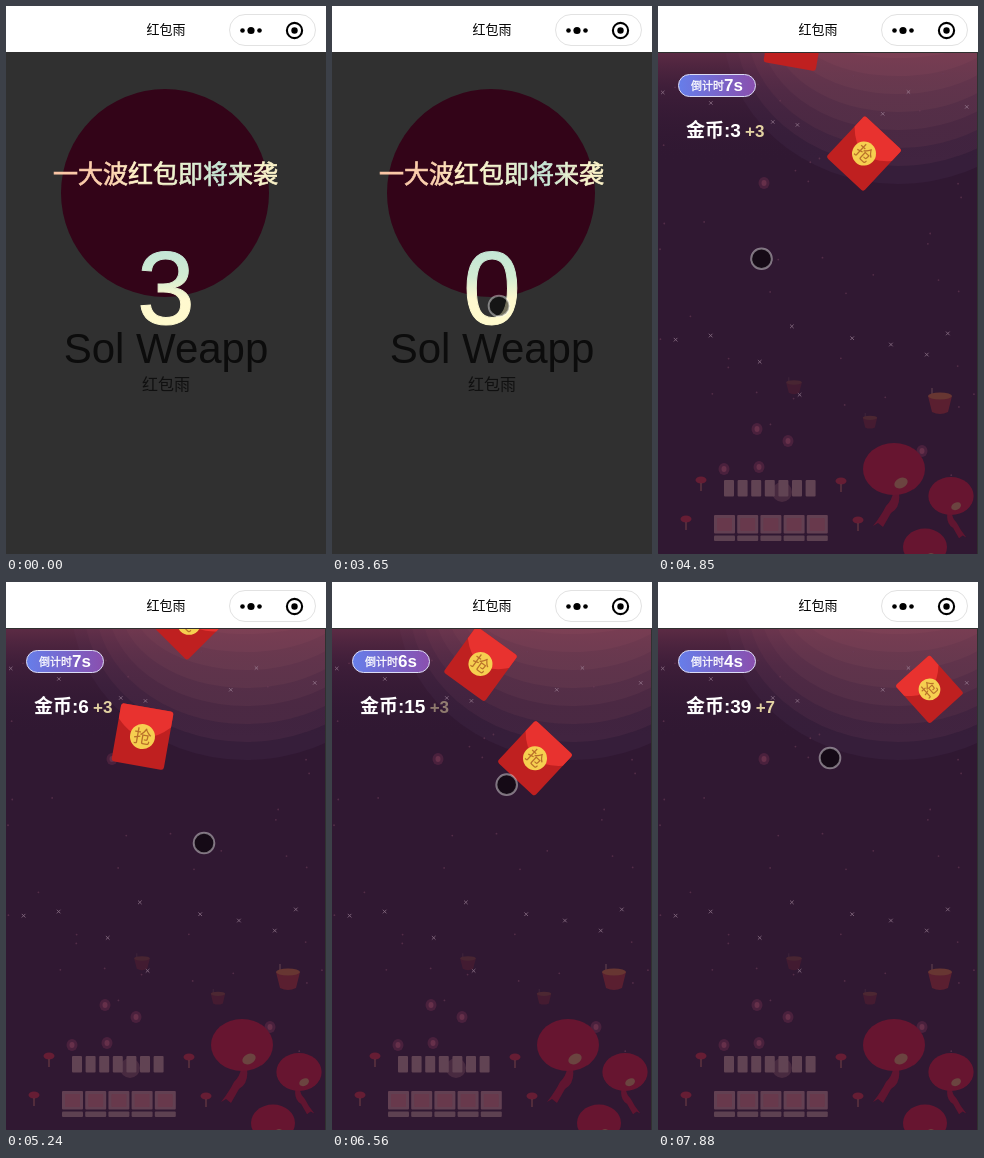
An HTML page for the animation above (8000 ms loop, 320 px wide and 548 px high).

```html
<!DOCTYPE html>
<html lang="zh">
<head>
<meta charset="utf-8">
<style>
html, body { margin: 0; width: 100%; height: 100%; overflow: hidden; background: #fff; }
svg { display: block; width: 320px; height: 548px; }
text { font-family: "Liberation Sans", "Noto Sans CJK SC", "Noto Sans CJK", Arial, sans-serif; }
.mid { text-anchor: middle; }
.bold { font-weight: 700; fill: #fff; }
</style>
</head>
<body>
<svg viewBox="0 0 320 548" xmlns="http://www.w3.org/2000/svg">
  <defs>
    <linearGradient id="title" gradientUnits="userSpaceOnUse" x1="47" y1="0" x2="272" y2="0">
      <stop offset="0" stop-color="#fbc4a4"/><stop offset=".26" stop-color="#fcd3b0"/>
      <stop offset=".38" stop-color="#fff6cc"/><stop offset=".52" stop-color="#f2f3cd"/>
      <stop offset=".74" stop-color="#c6e7d6"/><stop offset=".9" stop-color="#f6f3cc"/>
      <stop offset="1" stop-color="#fdf3c8"/>
    </linearGradient>
    <linearGradient id="digit" gradientUnits="userSpaceOnUse" x1="0" y1="246" x2="0" y2="318">
      <stop offset="0" stop-color="#c4e6d6"/><stop offset=".35" stop-color="#d2ecd2"/>
      <stop offset=".65" stop-color="#fff9cf"/><stop offset="1" stop-color="#fffacd"/>
    </linearGradient>
    <linearGradient id="pill">
      <stop offset="0" stop-color="#667eea"/><stop offset="1" stop-color="#8a4fae"/>
    </linearGradient>
    <linearGradient id="dusk" x1="0" y1="0" x2="0" y2="1">
      <stop offset="0" stop-color="#7a3850" stop-opacity=".6"/>
      <stop offset=".35" stop-color="#5c2a48" stop-opacity=".3"/>
      <stop offset="1" stop-color="#301832" stop-opacity="0"/>
    </linearGradient>
    <clipPath id="stage"><rect y="47" width="319" height="501"/></clipPath>
    <g id="packet">
      <rect x="-26.5" y="-29.5" width="53" height="59" rx="3" fill="#bf2020"/>
      <path d="M-26.5 -14V-26.5q0 -3 3 -3H23.5q3 0 3 3V-14Q0 14 -26.5 -14z" fill="#e8322f"/>
      <circle r="12.5" fill="#f6cf50"/>
      <text class="mid" y="6.5" font-size="18" fill="#b9702a">抢</text>
    </g>
  </defs>

  <g id="intro">
    <rect y="46" width="320" height="502" fill="#303030"/>
    <circle cx="159" cy="187" r="104" fill="#330418"/>
    <text class="mid" x="160" y="357" font-size="42" fill="#0c0c0c">Sol Weapp</text>
    <text class="mid" x="160" y="384" font-size="16" fill="#101010">红包雨</text>
    <text class="mid" x="159.5" y="176.5" font-size="25" fill="url(#title)" stroke="url(#title)" stroke-width=".7">一大波红包即将来袭</text>
    <text class="mid" id="big" x="160" y="317.6" font-size="104" fill="url(#digit)" stroke="url(#digit)">3</text>
  </g>

  <g id="game" clip-path="url(#stage)">
    <g id="scene"></g>
    <g id="rain"></g>
    <g id="hud">
      <rect x="20.5" y="68.5" width="77" height="22" rx="11" fill="url(#pill)" stroke="#dcdcf4"/>
      <text x="33" y="84" font-size="11" fill="#fff" stroke="#fff" stroke-width=".3">倒计时</text>
      <text class="bold" id="left" x="66" y="85" font-size="17"></text>
      <text class="bold" x="28" y="131" font-size="19">金币:</text>
      <text class="bold" id="coins" x="72.3" y="131" font-size="19"></text>
      <text class="bold" id="gain" y="131" font-size="17" style="fill:#fff0b4"></text>
    </g>
  </g>

  <rect width="320" height="46" fill="#fff"/>
  <text class="mid" x="160" y="28" font-size="13" fill="#000">红包雨</text>
  <rect x="223.5" y="8.5" width="86" height="31" rx="15.5" fill="#fff" stroke="#e2e2e2"/>
  <circle cx="236.5" cy="24.5" r="2.3"/><circle cx="245" cy="24.5" r="3.6"/><circle cx="253.5" cy="24.5" r="2.3"/>
  <circle cx="288.5" cy="24.5" r="7.6" fill="none" stroke="#000" stroke-width="2.1"/>
  <circle cx="288.5" cy="24.5" r="3.2"/>

  <circle id="cursor" r="10.3" fill="#000" fill-opacity=".55" stroke="#fff" stroke-opacity=".42" stroke-width="2"/>
</svg>
<script>
const $ = id => document.getElementById(id);
const LOOP = 8000;
const SECOND = 930;                 // one count of the countdown
const MOVE = 2948, TICK = 132.4;    // motion starts, then advances in ticks
const GAME = 6;                     // tick at which the game opens
const FALL = 41, CATCH = 5;         // px per tick, ticks from entry to catch

const packets = [
  { x: 64, enter: 7.4, angle: 42, size: .96, won: 3 },
  { x: 206, enter: 10.4, angle: 43, size: .96, won: 3 },
  { x: 136.5, enter: 13.23, angle: 10, size: 1, won: 5 },
  { x: 183, enter: 16, angle: 45, size: .95, won: 1 },
  { x: 102, enter: 19.17, angle: 9, size: .9, won: 3 },
  { x: 203, enter: 22.7, angle: 43, size: .96, won: 6 },
  { x: 148.5, enter: 25, angle: 36, size: .96, won: 7 },
  { x: 177, enter: 28.63, angle: -28, size: 1, won: 4 },
  { x: 206, enter: 30.8, angle: 43, size: .96, won: 7 },
  { x: 271.5, enter: 34.38, angle: -42, size: .87, won: 0 }
];

// cursor key points: tick, x, y
const path = [
  [0, 224, 485], [1, 183, 338], [2, 161, 302], [5, 167, 300], [10, 161, 281],
  [13, 72, 250], [17, 198, 261], [19, 142, 244], [21, 182, 214], [23, 138, 238],
  [25, 108, 228], [28, 208, 190], [30, 148, 207], [36, 203, 172], [37, 172, 176]
];

let seed = 11;
const rand = (lo, hi) => {
  seed = (seed * 16807) % 2147483647;
  return lo + (hi - lo) * seed / 2147483647;
};
const repeat = (n, fn) => Array.from({ length: n }, (_, i) => fn(i)).join("");
const mix = (a, b, k) => a + (b - a) * k;

const box = (x, y, w, h, fill) => `<rect x="${x}" y="${y}" width="${w}" height="${h}" rx="1" fill="${fill}"/>`;
const oval = (x, y, rx, ry, fill, more = "") =>
  `<ellipse cx="${x}" cy="${y}" rx="${rx}" ry="${ry}" fill="${fill}" ${more}/>`;

const lantern = (x, y, s, flip) => `<g transform="translate(${x} ${y}) scale(${s})">
  <path transform="scale(${flip} 1)" d="M5 24q2 14 -8 20l-8 14l-5 -4l-5 3q8 -10 13 -20q6 -6 7 -13z" fill="#601530"/>
  ${oval(0, 0, 31, 26, "#671530") + oval(7, 14, 7, 5, "#6b4440", 'transform="rotate(-25 7 14)"')}</g>`;

const bowl = (x, y, s, a) => `<g transform="translate(${x} ${y}) scale(${s})" opacity="${a}">
  <path d="M-12 -7L-8 9Q0 13 8 9L12 -7z" fill="#5f2030"/>
  <path d="M-8 -15V-8" stroke="#6a4a55"/>${oval(0, -7, 12, 3.5, "#6e3a32")}</g>`;

const star = (x, y, r) => `<path d="M${x - r} ${y - r}l${2 * r} ${2 * r}M${x + r} ${y - r}l${-2 * r} ${2 * r}"
  stroke="#a58b9f" stroke-width=".9" opacity=".7"/>`;

const lamp = (x, y) => oval(x, y, 5.5, 3.5, "#661d34") +
  `<path d="M${x} ${y + 3}v8" stroke="#623640" stroke-width="1.4"/>`;

const glow = (x, y) => oval(x, y, 5.5, 6, "#6b2c4c", 'opacity=".45"') + oval(x, y, 2.5, 3, "#89425c", 'opacity=".45"');

function moonBand(i) {
  const k = 1 - i / 7;
  const rgb = [mix(132, 56, k), mix(78, 31, k), mix(92, 60, k)].map(Math.round);
  return oval(240, 20, mix(90, 175, k), mix(32, 158, k), `rgb(${rgb})`, 'opacity=".85"');
}

$("scene").innerHTML =
  box(0, 46, 320, 502, "#301832") +
  repeat(8, moonBand) + box(0, 46, 320, 110, "url(#dusk)") +
  repeat(40, () => `<circle cx="${rand(2, 316)}" cy="${rand(60, 470)}" r=".9" fill="#6a3c56" opacity=".6"/>`) +
  repeat(7, i => star(rand(0, 45) + i * 45, rand(66, 120), 1.7)) +
  repeat(9, i => star(rand(0, 35) + i * 34, rand(308, 392), 1.8)) +
  glow(106, 177) + glow(99, 423) + glow(130, 435) + glow(66, 463) + glow(101, 461) + glow(264, 445) +
  bowl(282, 397, 1, .9) + bowl(212, 416, .6, .45) + bowl(136, 381, .65, .4) +
  oval(124, 486, 10, 10, "#664052", 'opacity=".45"') +
  repeat(7, i => box(66 + i * 13.6, 474, 10, 16.5, "#614353")) +
  repeat(5, i => {
    const x = 56 + i * 23.2;
    return box(x, 509, 21, 18.5, "#624052") + box(x + 3, 512, 15, 13, "#68394c") + box(x, 529.5, 21, 5.5, "#5d4151");
  }) +
  lamp(43, 474) + lamp(183, 475) + lamp(28, 513) + lamp(200, 514) +
  lantern(236, 463, 1, 1) + lantern(293, 490, .73, -1) + lantern(267, 541, .71, 1);

$("rain").innerHTML = repeat(packets.length, () => '<use href="#packet"/>');
const drops = [...$("rain").children];
const show = (el, on) => { el.style.display = on ? "" : "none"; };

function cursorAt(n) {
  const i = path.findIndex(p => p[0] > n);
  if (i < 0) return path[path.length - 1].slice(1);
  const [n0, x0, y0] = path[i - 1], [n1, x1, y1] = path[i], k = (n - n0) / (n1 - n0);
  return [mix(x0, x1, k), mix(y0, y1, k)];
}

function drawRain(n) {
  let coins = 0, won = 0, age = 99;
  packets.forEach((p, i) => {
    const y = (n - p.enter) * FALL, taken = Math.ceil(p.enter + CATCH);
    show(drops[i], y > 0 && n <= taken);
    drops[i].setAttribute("transform", `translate(${p.x} ${y}) rotate(${p.angle}) scale(${p.size})`);
    if (n >= taken) {
      coins += p.won;
      won = p.won;
      age = n - taken;
    }
  });
  $("coins").textContent = coins;
  $("gain").textContent = "+" + won;
  $("gain").setAttribute("x", 76.5 + 10.6 * String(coins).length);
  $("gain").setAttribute("opacity", Math.max(0, 1 - (age / 2.7) ** 2));
}

function draw(t) {
  const n = Math.floor((t - MOVE) / TICK);
  $("big").textContent = Math.max(0, 3 - Math.floor((t + 90) / SECOND));

  show($("cursor"), n >= 0);
  if (n >= 0) $("cursor").setAttribute("transform", `translate(${cursorAt(n)})`);

  show($("game"), n >= GAME);
  show($("hud"), n > GAME);
  $("game").setAttribute("opacity", n > GAME ? 1 : .65);
  $("left").textContent = 8 - Math.floor((t - 3920) / SECOND) + "s";
  drawRain(n);
}

const begin = performance.now();
function frame() {
  draw((performance.now() - begin) % LOOP);
  requestAnimationFrame(frame);
}
frame();
</script>
</body>
</html>
```
